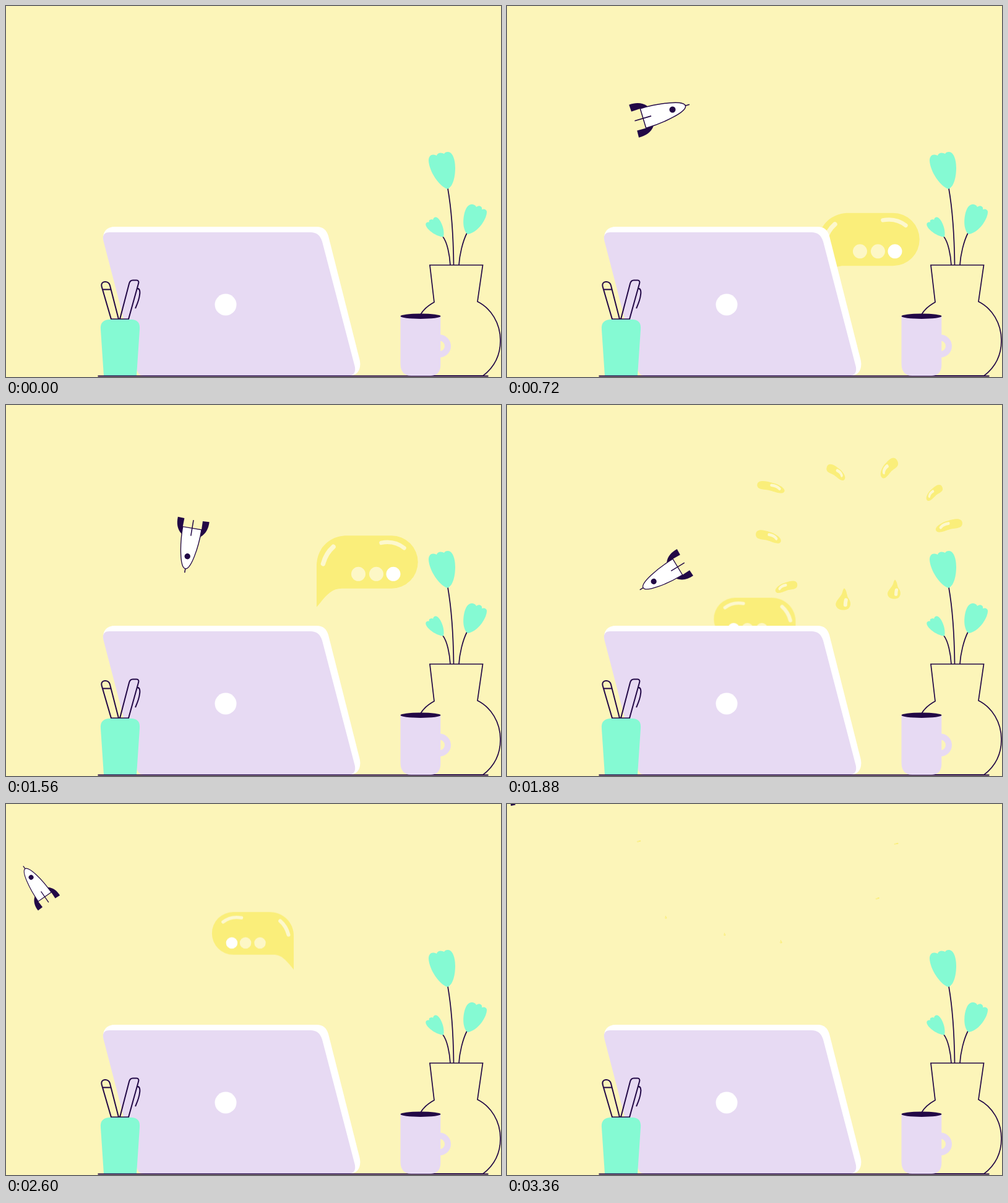
These frames come from a looping animation (800 by 600 pixels, 3.4 s). An HTML page without scripts:

```html
<!DOCTYPE html>
<html lang="en">
<head>
<meta charset="utf-8">
<title>Desk chat</title>
<style>
  html, body { margin: 0; width: 100%; height: 100%; overflow: hidden; background: #fcf5b9; }
  svg { display: block; width: 800px; height: 600px; }
  .ink { fill: none; stroke: #220846; stroke-width: 1.7; }
  .dark { fill: #220846; }
  .mint { fill: #85fad3; }
  .lilac { fill: #e7daf3; }
  .yolk { fill: #faee7a; }
  .shine { fill: none; stroke: #fdf8cd; stroke-linecap: round; }

  .rocket, .right, .left, .drop { animation: 3400ms linear infinite; }
  .rocket { animation-name: flight; }
  .right { animation-name: right; transform-origin: 584px 255px; }
  .left { animation-name: left; }
  .drop { animation-name: burst; }
  .late .drop { animation-delay: -2240ms; }

  @keyframes flight {
    0%, 2.353% { translate: 222px 415px; rotate: -26deg; scale: 1; }
    3.529% { translate: 213px 392px; rotate: -25deg; }
    5.882% { translate: 190px 345px; rotate: -22deg; }
    9.412% { translate: 157px 275px; rotate: -9deg; }
    12.941% { translate: 146.8px 218px; rotate: 9.1deg; scale: 1; }
    15.882% { translate: 180px 184px; rotate: 32deg; }
    18.824% { translate: 243px 175px; rotate: 62deg; }
    24.706% { translate: 262px 169px; rotate: 90deg; }
    30.588% { translate: 277.5px 174.5px; rotate: 111.7deg; scale: .937; }
    35.294% { translate: 289px 189px; rotate: 138deg; }
    40.588% { translate: 297px 208px; rotate: 165deg; }
    45.882% { translate: 296px 228.5px; rotate: 189.4deg; scale: .904; }
    50.588% { translate: 279px 254px; rotate: 214deg; }
    55.294% { translate: 251px 277px; rotate: 238.6deg; scale: .886; }
    60% { translate: 212px 286px; rotate: 258deg; }
    64.706% { translate: 160px 274px; rotate: 278deg; }
    68.235% { translate: 112px 243px; rotate: 294deg; }
    72.353% { translate: 78px 190px; rotate: 311deg; }
    76.471% { translate: 48.5px 130px; rotate: 325deg; scale: .754; }
    80.588% { translate: 27px 92px; rotate: 334deg; }
    84.706% { translate: 16px 64px; rotate: 340deg; }
    91.765% { translate: 15px 14px; rotate: 346deg; }
    98.824%, 100% { translate: 18.5px -30px; rotate: 350deg; scale: .62; }
  }
  @keyframes right {
    0%, 4% { translate: 1.6px 206px; scale: 0; }
    8.235% { translate: 1.5px 188.2px; scale: 1; }
    52.94% { translate: -.3px -35.3px; scale: 1; }
    52.941%, 100% { translate: -.3px -35.3px; scale: 0; }
  }
  @keyframes left {
    0%, 36.47% { translate: 2.8px 258.7px; opacity: 0; }
    36.471% { translate: 2.8px 258.7px; opacity: 1; }
    87.058% { translate: -.75px -68.6px; opacity: 1; }
    87.059%, 100% { translate: -.75px -68.6px; opacity: 0; }
  }
  @keyframes burst {
    0%, 52.94% { translate: calc(var(--x) * .4) calc(var(--y) * .4); scale: 0; }
    52.941% { translate: calc(var(--x) * .4) calc(var(--y) * .4); scale: .7; }
    55.294% { translate: var(--x) var(--y); scale: 1; }
    58.824% { translate: calc(var(--x) * 1.4) calc(var(--y) * 1.4); scale: .8; }
    64.706% { translate: calc(var(--x) * 1.65) calc(var(--y) * 1.65); scale: .2; }
    65.88% { translate: calc(var(--x) * 1.67) calc(var(--y) * 1.67); scale: .1; }
    65.882%, 100% { translate: calc(var(--x) * 1.67) calc(var(--y) * 1.67); scale: 0; }
  }
</style>
</head>
<body>
<svg viewBox="0 0 800 600">
  <defs>
    <g id="bubble">
      <path class="yolk" d="M502 327V260C502 233 522 211.500 551 211.500H623A42.750 42.750 0 0 1 623 297H543C525 297 517 309 502 327Z"/>
      <path class="shine" stroke-width="7.500" d="M512.500 257Q517 240 529 229.500"/>
      <path class="shine" stroke-width="6.500" d="M606.500 223Q628 219 643.500 231.500"/>
      <g fill="#fdf7c6">
        <circle cx="569.500" cy="273.500" r="11.500"/>
        <circle cx="598.500" cy="273.500" r="11.500"/>
        <circle cx="626" cy="273.500" r="11.500" fill="#fff"/>
      </g>
    </g>
    <g id="bean">
      <path class="yolk" d="M-22 -5C-20 -12 -8 -10 2 -7C12 -5 24 2 22 7C19 13 8 8 0 6C-8 3 -24 6 -22 -5Z"/>
      <path class="shine" stroke-width="4.500" d="M1 -3Q10 -2 14 3"/>
    </g>
    <g id="tear">
      <path class="yolk" d="M2 -18C6 -15 6 -9 8 -3C13 3 14 10 9 15C3 19 -8 18 -11 11C-14 3 -3 -3 -1 -11Q0 -16 2 -18Z"/>
      <path class="shine" stroke-width="6" d="M5 1Q4 5 4 9"/>
    </g>
    <g id="fin"><path class="dark" d="M-17 20C-26 27 -29 37 -28.500 49L-16.600 48.500L-17 33Z"/></g>
  </defs>

  <!-- burst bubbles -->
  <g transform="translate(584 225)">
    <g class="drop" style="--x:-157px;--y:-92px"><use href="#bean"/></g>
    <g class="drop" style="--x:-161px;--y:-12px"><use href="#bean" transform="scale(.92 1.1)"/></g>
    <g class="drop" style="--x:-132px;--y:69px"><use href="#bean" transform="scale(-.8 1)"/></g>
    <g class="drop" style="--x:-41px;--y:89px"><use href="#tear"/></g>
    <g class="drop" style="--x:41px;--y:73px"><use href="#tear" transform="scale(.88)"/></g>
    <g class="drop" style="--x:130px;--y:-30px"><use href="#bean" transform="scale(-.97 1.1)"/></g>
    <g class="drop" style="--x:106px;--y:-83px"><use href="#bean" transform="rotate(-22) scale(-.7 .95)"/></g>
    <g class="drop" style="--x:33px;--y:-123px"><use href="#bean" transform="rotate(-25) scale(-.78 1.25)"/></g>
    <g class="drop" style="--x:-52px;--y:-116px"><use href="#bean" transform="rotate(15) scale(.75 1.05)"/></g>
  </g>
  <g class="late" transform="translate(398 150) scale(-.8 .8)">
    <g class="drop" style="--x:140px;--y:-68px"><use href="#bean" transform="scale(.9 1)"/></g>
    <g class="drop" style="--x:107px;--y:25px"><use href="#tear" transform="scale(.9)"/></g>
    <g class="drop" style="--x:35px;--y:46px"><use href="#tear" transform="scale(.85)"/></g>
    <g class="drop" style="--x:-34px;--y:55px"><use href="#tear"/></g>
    <g class="drop" style="--x:-152px;--y:2px"><use href="#bean" transform="scale(.9 1.1)"/></g>
    <g class="drop" style="--x:-175px;--y:-65px"><use href="#bean"/></g>
    <g class="drop" style="--x:33px;--y:-123px"><use href="#bean" transform="rotate(-25) scale(-.78 1.25)"/></g>
    <g class="drop" style="--x:-52px;--y:-116px"><use href="#bean" transform="rotate(15) scale(.75 1.05)"/></g>
  </g>

  <g class="right"><use href="#bubble"/></g>
  <g class="left"><use href="#bubble" transform="translate(870.1 4.3) scale(-.807 .807)"/></g>

  <g class="rocket">
    <use href="#fin"/>
    <use href="#fin" transform="scale(-1 1)"/>
    <path class="ink" style="fill:#fff;stroke-width:1.5" d="M-17 33C-17 0 -10 -40.500 0 -40.500C10 -40.500 17 0 17 33Z"/>
    <path class="ink" d="M0 -47.600V-40.500M0 19V47.600"/>
    <circle class="dark" cy="-18" r="5.200"/>
  </g>

  <!-- laptop -->
  <path fill="#fff" d="M157 378C156 366 162 357 176 357H502C512 357 518 362 521 372L571.500 572C575 587 568 598 555 598H300Z"/>
  <path class="lilac" d="M157.500 380C155 371 159 366 167 366H492C502 366 508 371 511 381L563.500 582C566 592 562 598 553 598H224C216 598 213 594 211.500 588Z"/>
  <circle cx="355" cy="483" r="17.500" fill="#fff"/>

  <!-- pens -->
  <g class="ink" style="stroke-width:2">
    <path d="M170 506.500L155 455C153 449 156 446 160 446C165 446 167 448 168 452L182 506.500M156 458.500H169"/>
    <path d="M184 506.500L199 449C200 445 202 443.500 205 443.500H211C214 443.500 215 446 214 449L198 506.500M211 457C216 456 217 461 216 467C215 476 212 482 209 489"/>
    <path d="M169 506.500H199"/>
  </g>
  <path class="mint" d="M153 523C152 512 158 507 168 507H202C212 507 217 512 216 523L211 598H158Z"/>

  <!-- flowers -->
  <path class="ink" d="M714 295C721 335 723 375 723.500 419M706 373C713 382 717 402 718 419M745 367C738 381 733 402 732 419"/>
  <g class="mint">
    <path d="M713 296C700 291 684 268 683 250C683 243 687 240 691 240.500Q694 240.500 696 242Q697 238 702 237.500Q706 237.500 708 239Q710 235.500 715 236C722 237 726 248 726 262C726 275 723 293 713 296Z"/>
    <path d="M746 369C737 362 738 340 743 329C746 322 751 320 755 321Q759 322 760 325Q764 322 767 324Q770 326 769 329Q775 327 777 332C778 343 763 367 746 369Z"/>
    <path d="M707 373.500C696 373 682 363 679 356C677 351 680 349 684 349.500Q683 346 686 345.500Q689 344.500 690 346Q691 341 695 341.500C702 343 710 362 707 373.500Z"/>
  </g>

  <!-- vase, table, mug -->
  <path class="ink" d="M670 499C675 490 683 484 692 479L685 419H770.500L762 478C784 489 799 513 799 541C799 566 788 585 771 598H688"/>
  <path class="ink" style="stroke-width:2" d="M148.500 598.500H779.500"/>
  <circle cx="700.500" cy="550" r="13.500" fill="none" stroke="#e7daf3" stroke-width="10"/>
  <path class="lilac" d="M637.500 501.500H702.300V580Q702.300 598 685 598H655Q637.500 598 637.500 578Z"/>
  <ellipse class="dark" cx="670" cy="501.700" rx="32.500" ry="4.200"/>
</svg>
</body>
</html>
```
